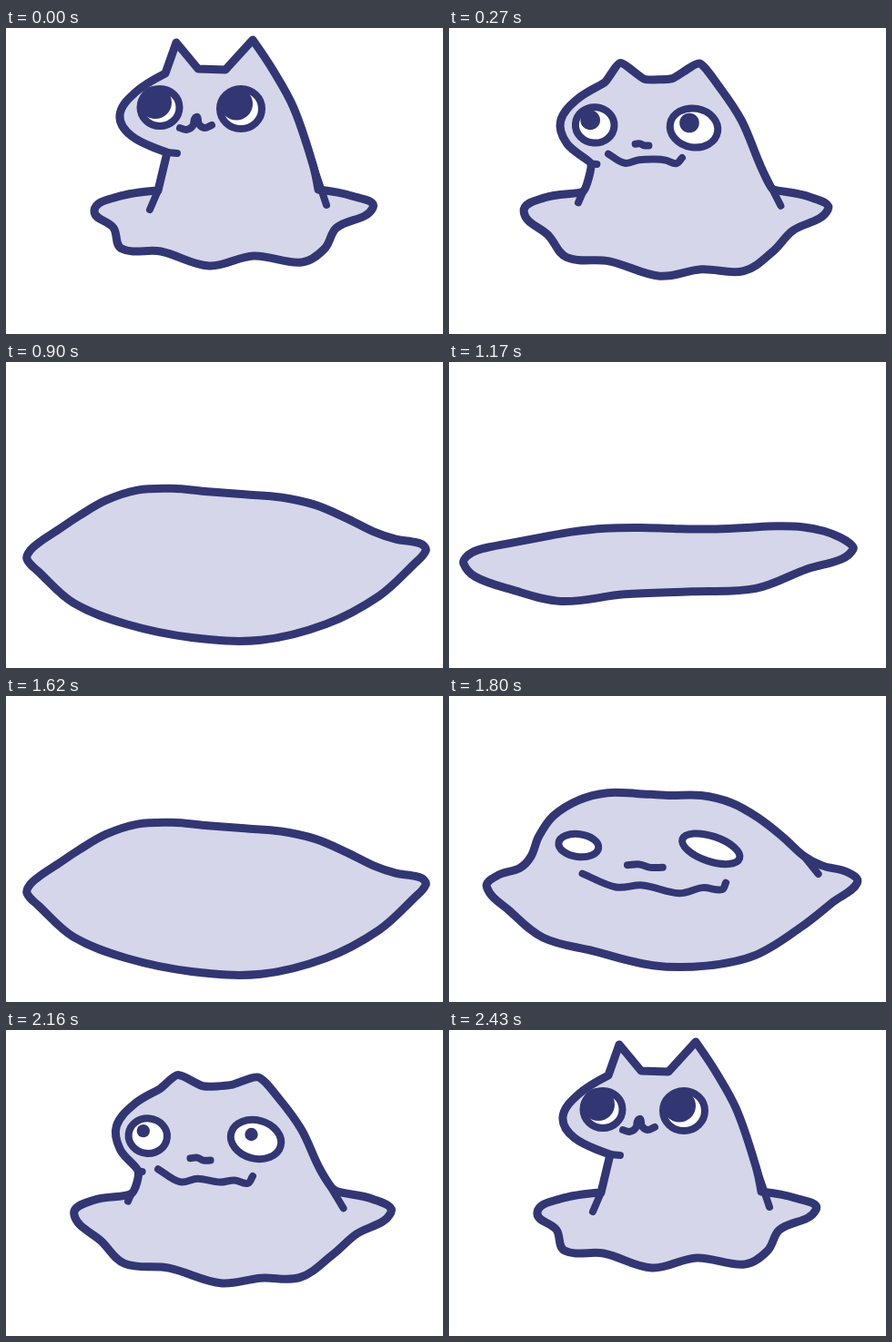
These frames come from a looping animation (480 px wide and 337 px high, 2.52 s). An HTML page:

```html
<!DOCTYPE html>
<html lang="en">
<head>
<meta charset="utf-8">
<title>Melting cat</title>
<style>
  html, body { margin: 0; width: 100%; height: 100%; overflow: hidden; background: #fff; }
  svg { display: block; width: 480px; height: 337px; }
  path, ellipse { fill: none; stroke: #323673; stroke-width: 8; stroke-linecap: round; stroke-linejoin: round; }
  #body { fill: #d5d6ea; stroke-width: 9; }
  ellipse { fill: #fff; }
  circle { fill: #323673; }
</style>
</head>
<body>
<svg viewBox="0 0 480 337">
  <path id="body"/>
  <path id="folds"/>
  <g id="face">
    <ellipse id="leftEye"/>
    <ellipse id="rightEye"/>
    <circle id="leftPupil"/>
    <circle id="rightPupil"/>
    <path id="mouth"/>
    <path id="nose"/>
  </g>
</svg>
<script>
const STEP = 90, SLOTS = 28, LAST = 12;
const KEY_STEPS = [0, 5, 9, LAST];
const $ = id => document.getElementById(id);
const lerp = (a, b, f) => a + (b - a) * f;
const pairs = (...v) => v.flatMap((x, i) => i % 2 ? [] : [[x, v[i + 1]]]);

// Body key points, clockwise from the left tip of the skirt
const NECK_BASE = 2, CHIN = 3, FLANK = 14, RIGHT_TIP = 17;
const CORNERS = [NECK_BASE, CHIN, 7, 8, 9, 10, 11, 15];
const cat = pairs(
  97,201, 122,186, 167,179, 177,137, 138,119, 125,96, 142,71, 175,50, 187,16,
  211,45, 241,46, 271,13, 293,46, 316,88, 337,150, 343,178, 380,185, 403,198,
  363,220, 350,243, 325,258, 272,251, 223,262, 170,246, 127,243, 118,220);
const blob = pairs(
  60,204, 80,188, 118,181, 124,168, 117,140, 119,112, 141,88, 166,74, 190,72,
  220,73, 252,70, 281,78, 305,96, 330,124, 351,157, 374,176, 418,187, 436,203,
  398,229, 364,251, 322,282, 285,288, 244,290, 185,273, 133,267, 97,242);

// A puddle between two tips; each rim is a sum of sine waves
function puddle([lx, ly], [rx, ry], top, bottom) {
  return cat.map((_, i) => {
    const upper = i <= RIGHT_TIP;
    const a = Math.PI * (upper ? i / RIGHT_TIP : (cat.length - i) / (cat.length - RIGHT_TIP));
    const u = (1 - Math.cos(a)) / 2;
    const rim = (upper ? top : bottom).reduce((sum, amp, k) => sum + amp * Math.sin((k + 1) * a), 0);
    return [lerp(lx, rx, u), lerp(ly, ry, u) + (upper ? -rim : rim)];
  });
}

const bodyPoses = [
  cat, blob,
  puddle([23, 217], [461, 208], [64, 11, -9, -2, -2, -1.5, 3], [86, -1, -11, 1.5, -4, -1, -2]),
  puddle([16, 222], [444, 206], [33, -0.5, 2, -1, 0, 2], [43, 4, -1, 0.5, -3, -1, 3])
];

// The face sinks and flattens once the blob turns into a puddle
const sinkPoint = ([x, y]) => [lerp(240, x, 1.1), 205 + (y - 170) * 0.35];
const sinkLine = (a, b) => [a, b, b.map(sinkPoint), b.map(sinkPoint)];
const sinkEye = (a, b) => {
  const [x, y, rx, ry, tilt] = b;
  const sunk = [...sinkPoint([x, y]), rx * 1.1, ry * 0.35, tilt / 2];
  return [[a], [b], [sunk], [sunk]];
};

const mouthPoses = sinkLine(
  pairs(191,110, 198,112, 205,108, 209,98, 212,106, 218,110, 226,107),
  pairs(151,182, 186,204, 214,201, 252,214, 277,205, 297,208, 301,197));
const nosePoses = sinkLine(
  Array(4).fill([209, 101]),
  pairs(198,168, 211,167, 222,172, 235,172));
// Eyes: centre, radii, tilt in degrees
const eyePoses = {
  left: sinkEye([169, 87.5, 21.5, 20.5, 0], [147, 136, 21, 18.5, 10]),
  right: sinkEye([258, 89, 23, 22, 0], [285.5, 141.5, 31.5, 20.5, 25])
};
// Creases: starting body point and reach as cat, blob, puddle, flat
const creases = [
  [CHIN, pairs(11,1, 0,0, 0,0, 0,0)],
  [NECK_BASE, pairs(-9,21, 0,0, 0,0, 0,0)],
  [FLANK, pairs(15,45, 32,40, 0,0, 0,0)]
];

function poseAt(poses, step) {
  let k = 0;
  while (k < 2 && step >= KEY_STEPS[k + 1]) k++;
  const f = (step - KEY_STEPS[k]) / (KEY_STEPS[k + 1] - KEY_STEPS[k]);
  return poses[k].map((p, i) => p.map((v, j) => lerp(v, poses[k + 1][i][j], f)));
}

// Smooth curve through all points; softness 0 makes a point a sharp corner
function curve(pts, loop, softness = () => 1) {
  const n = pts.length;
  const at = i => pts[loop ? (i + n) % n : Math.max(0, Math.min(n - 1, i))];
  const tangent = i => {
    const [ax, ay] = at(i - 1), [bx, by] = at(i + 1);
    const s = softness(i % n) * 0.35 / (Math.hypot(bx - ax, by - ay) || 1);
    return [(bx - ax) * s, (by - ay) * s];
  };
  let d = "M" + at(0);
  for (let i = 0; i < (loop ? n : n - 1); i++) {
    const [px, py] = at(i), [qx, qy] = at(i + 1);
    const [ux, uy] = tangent(i), [vx, vy] = tangent(i + 1);
    const len = Math.hypot(qx - px, qy - py);
    d += `C${px + ux * len},${py + uy * len} ${qx - vx * len},${qy - vy * len} ${qx},${qy}`;
  }
  return loop ? d + "Z" : d;
}

function set(id, attrs) {
  for (const name in attrs) $(id).setAttribute(name, attrs[name]);
}

function draw(step) {
  const melt = Math.min(1, step / KEY_STEPS[1]);
  const body = poseAt(bodyPoses, step);
  set("body", { d: curve(body, true, i => CORNERS.includes(i) ? melt : 1) });
  set("folds", {
    d: creases.map(([i, reach]) => {
      const [[dx, dy]] = poseAt(reach.map(r => [r]), step);
      return `M${body[i]}l${dx},${dy}`;
    }).join("")
  });
  set("mouth", { d: curve(poseAt(mouthPoses, step)) });
  set("nose", { d: curve(poseAt(nosePoses, step)) });
  for (const side in eyePoses) {
    const [[cx, cy, rx, ry, tilt]] = poseAt(eyePoses[side], step);
    set(side + "Eye", { cx, cy, rx, ry, transform: `rotate(${tilt} ${cx} ${cy})` });
    set(side + "Pupil", { cx: cx - 5, cy: cy - 5.5, r: 18 * (1 - melt) });
  }
  $("face").style.display = step < 8 ? "" : "none";
}

// Melt down, rest, then run the same steps backwards
const start = performance.now();
let shown = -1;
function tick() {
  const slot = Math.floor((performance.now() - start) / STEP) % SLOTS;
  const step = Math.max(0, Math.min(slot - 1, SLOTS - 1 - slot, LAST));
  if (step !== shown) draw(shown = step);
  requestAnimationFrame(tick);
}
tick();
</script>
</body>
</html>
```
